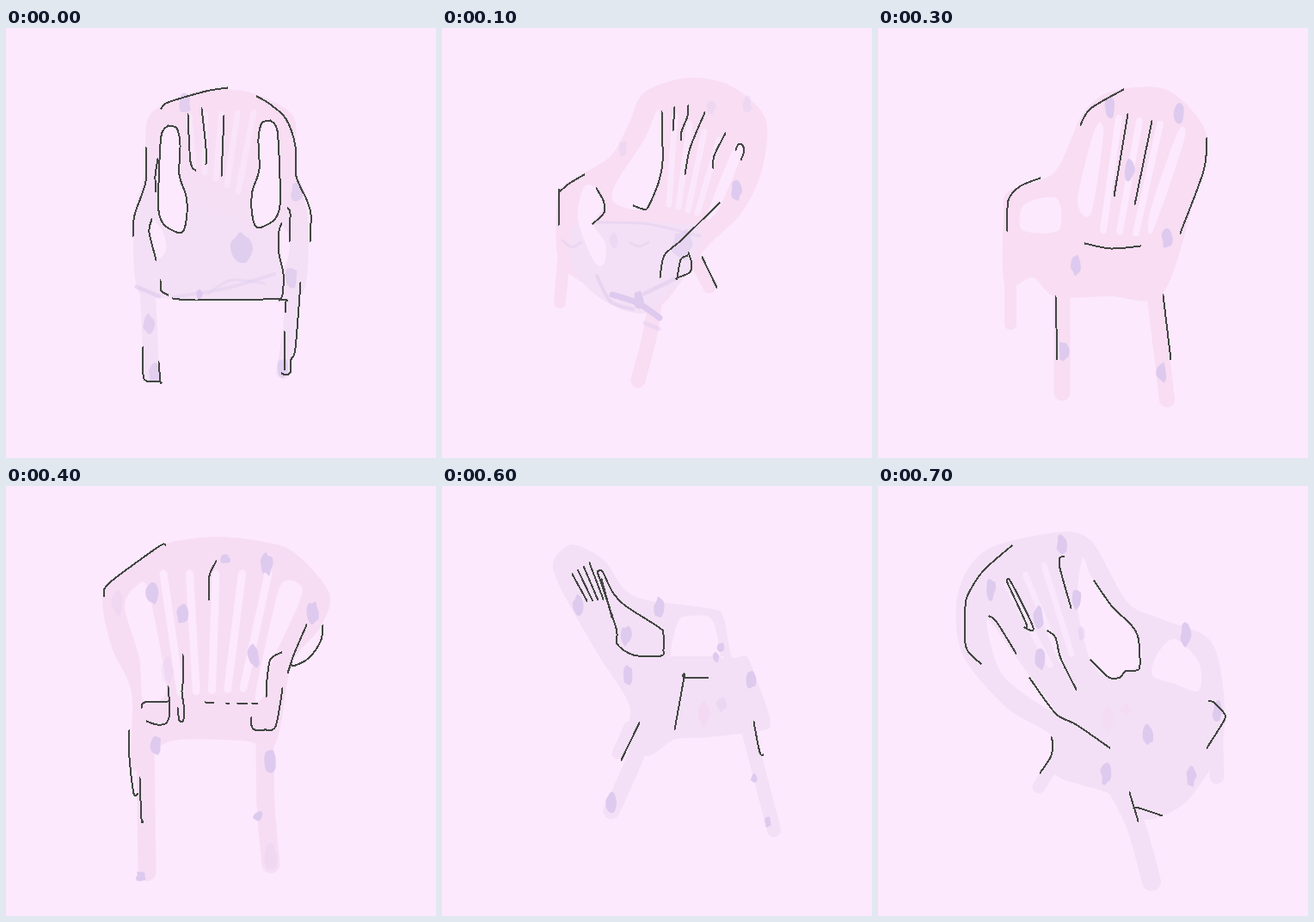
These frames come from a looping animation (500x500 px, 800 ms). An HTML page:

```html
<!DOCTYPE html>
<html lang="en">
<head>
<meta charset="utf-8">
<title>Turning chair</title>
<style>
html, body { margin: 0; width: 100%; height: 100%; overflow: hidden; background: #fce9fe; }
svg { display: block; width: 100vw; height: 100vh; }
path { stroke-linecap: round; stroke-linejoin: round; }
.ink { shape-rendering: crispEdges; transform: translate(.5px, .5px); }
</style>
</head>
<body>
<svg id="stage" viewBox="0 0 500 500"></svg>
<script>
const STEP = 100;
const BG = '#fce9fe', PINK = '#f8ddf3', LILAC = '#f3e0f6', MARK = '#ddcaee', INK = '#434643';
const stage = document.getElementById('stage');

let seed = 7;
const random = () => (seed = seed * 16807 % 2147483647) / 2147483647;

const parse = text => text.split(' ').map(s => s.split(',').map(Number));
const join = points => points.map(p => p.join()).join(' ');
const mirror = (text, sum, dy = 0) => join(parse(text).map(([x, y]) => [sum - x, y + dy]));
const symmetric = (half, sum) => half + ' ' + mirror(half.split(' ').reverse().join(' '), sum);

// Catmull-Rom spline; a repeated point makes a corner.
function curve(text, closed) {
  const p = parse(text), n = p.length, k = 0.15;
  const at = i => closed ? p[(i + n) % n] : p[Math.max(0, Math.min(n - 1, i))];
  let d = 'M' + p[0];
  for (let i = 0; i < (closed ? n : n - 1); i++) {
    const [a, b, c, e] = [at(i - 1), at(i), at(i + 1), at(i + 2)];
    const out = b.map((v, j) => v + (c[j] - a[j]) * k);
    const into = c.map((v, j) => v - (e[j] - b[j]) * k);
    d += `C${out} ${into} ${c}`;
  }
  return d;
}

const blob = (pts, fill) => `<path d="${curve(pts, true)}" fill="${fill}"/>`;
const brush = (pts, width, color, alpha = 1) =>
  `<path d="${curve(pts)}" fill="none" stroke="${color}" stroke-width="${width}" opacity="${alpha}"/>`;
const hole = pts => blob(pts, BG);
const ink = (...lines) => `<g class="ink">${lines.map(l => brush(l, 2, INK)).join('')}</g>`;
const loop = pts => pts + ' ' + pts.split(' ')[0];

// n strokes spread evenly from the first to the last one
function fan(first, last, n) {
  const a = parse(first), b = parse(last);
  return Array.from({ length: n }, (_, i) =>
    join(a.map((p, j) => p.map((v, k) => v + (b[j][k] - v) * i / (n - 1)))));
}
const gaps = (first, last, n, width, alpha) =>
  fan(first, last, n).map(g => brush(g, width, BG, alpha)).join('');

// Ragged flower prints of about the same size
function prints(places, rx = 6, ry = 12, alpha = 1) {
  return parse(places).map(([x, y]) => {
    const ring = Array.from({ length: 11 }, (_, i) => {
      const turn = i / 11 * 2 * Math.PI, r = 0.75 + 0.4 * random();
      return [x + Math.cos(turn) * rx * r, y + Math.sin(turn) * ry * r].map(v => v.toFixed(1));
    });
    return `<g opacity="${alpha}">${blob(join(ring), MARK)}</g>`;
  }).join('');
}

function front() {
  const side = '188,113 198,116 202,135 201,170 209,195 210,215 206,235 198,237 183,228 177,212 177,180 180,125';
  const other = mirror(side, 495, -6);
  const fill = 'url(#fade)';
  return [
    brush('165,312 167,350 169,402', 18, LILAC), brush('333,300 330,350 322,400', 16, LILAC),
    blob(symmetric('225,73 185,88 164,108 162,165 149,220 152,300 180,314', 500), fill),
    gaps('213,102 218,160', '288,98 270,190', 5, 7, .6),
    hole(side), hole(other), hole('168,224 182,236 186,258 174,268'), hole('319,230 329,242 329,262 322,278'),
    brush('152,301 178,312', 5, MARK, .6), brush('195,313 255,303 312,286', 4, MARK, .4), brush('235,309 262,293 300,297', 3, MARK, .4),
    prints('208,88 338,191 332,290 167,345 172,402 322,396', 7, 12, .8), prints('274,256', 12, 18, .8), prints('225,309', 4, 6),
    ink(loop(side), loop(other),
      '180,93 188,86 232,73 257,69', '291,79 305,87 325,105 336,137 337,172 349,199 354,216 353,248',
      '162,138 162,178 149,217 147,242', '211,100 214,155 220,165', '227,93 232,139 232,158', '253,102 250,172', '174,190 173,172 176,152',
      '169,222 166,237 174,269', '327,209 330,215 329,248', '320,227 317,236 317,262 322,285 321,310 317,316',
      '179,293 180,305 188,310', '193,314 220,316 318,315 324,319 324,330', '342,296 336,372 331,385 330,400 325,403 320,401',
      '323,352 323,397', '159,370 159,402 163,410 179,411 179,411 177,388')
  ];
}

function frontTurned() {
  return [
    brush('143,250 137,319', 14, PINK), brush('248,315 241,360 228,410', 17, PINK), brush('295,270 311,301', 15, PINK),
    blob('285,58 335,67 376,105 372,165 348,215 305,258 258,320 225,330 170,300 136,270 134,200 145,180 195,150 218,110 235,75', PINK),
    blob('150,235 180,225 280,228 302,240 290,275 240,330 190,318 152,280', LILAC),
    hole('252,95 256,150 240,208 203,205 200,185 235,130'), hole('165,185 180,186 188,207 176,228 190,250 188,275 176,270 158,222'), hole('340,138 349,145 322,210 308,218'),
    gaps('271,102 264,205', '322,130 297,215', 4, 7, .85),
    brush('198,310 228,320 253,337', 7, MARK), brush('236,343 252,350', 5, MARK, .4), brush('180,226 240,228 300,242', 3, MARK, .45),
    brush('180,288 196,318 222,327', 4, MARK, .5), brush('235,309 272,291', 5, MARK, .5),
    brush('140,247 151,255 162,249', 3, MARK, .4), brush('219,250 230,254 240,249', 3, MARK, .4),
    prints('342,190 228,317'), prints('279,252', 12, 18, .55), prints('313,92 210,140 355,88 200,247', 5, 9, .35),
    ink('135,229 136,190 136,190 148,180 165,170', '179,186 187,200 188,214 175,227', '255,97 256,155 251,180 239,208 233,210 222,206',
      '270,92 268,119', '286,90 285,102 278,120 278,130', '305,98 288,139 282,170', '329,122 316,148 315,163', '341,141 344,135 348,135 351,142 347,153',
      '322,203 278,246 258,264 253,290', '286,261 290,274 287,284 273,290 273,290 277,269 285,264', '302,266 319,301')
  ];
}

function side() {
  return [
    brush('141,320 141,406', 20, LILAC), brush('235,322 275,362 309,391', 23, PINK),
    blob('350,84 376,96 388,145 375,220 340,275 300,312 235,340 131,338 121,325 134,285 143,230 160,214 174,212 176,175 186,157 245,153 300,130 320,108', PINK),
    hole('330,118 322,165 306,214 297,230 270,232 268,214 256,190 268,175 300,158'),
    brush('320,155 350,167 380,178', 5, MARK, .6), brush('365,166 381,170', 9, MARK), brush('352,160 375,198', 3, MARK, .5), brush('132,378 150,390', 7, MARK),
    prints('212,229 245,253 292,231 305,277 238,318', 5, 13), prints('149,292', 10, 17), prints('176,193 163,216', 4, 3),
    ink('188,209 188,177 198,166 218,166 222,168 240,213 240,213 215,212 188,209', '314,110 328,96 356,85 370,89 380,103 388,150',
      '349,124 336,160 327,171', '351,162 331,190', '342,189 328,208 321,226', '332,218 327,240 316,260 277,281 185,291 178,294 133,294 129,304 129,351',
      '269,219 269,234 269,234 282,236 306,216', '291,306 311,297 321,287', loop('145,331 145,331 148,310 158,313 207,315 216,331 216,331'),
      loop('230,312 236,308 263,309 255,319 255,326 234,328 230,322'), '311,297 317,306 316,315 308,316 300,308 304,300')
  ];
}

function backTurned(fill) {
  return [
    brush('154,250 154,344', 14, fill), brush('214,280 214,424', 19, fill), brush('318,280 336,432', 18, fill),
    blob('290,70 340,74 382,125 366,205 330,310 270,312 206,312 180,290 148,300 146,220 152,190 205,168 235,105 258,80', fill),
    hole('170,205 208,198 210,235 168,235'), hole('252,118 262,122 248,215 232,200'), hole('348,122 356,130 320,235 316,215'),
    gaps('280,105 262,235', '328,112 300,238', 3, 8),
    prints('270,92 350,100 292,165 336,245 230,275 216,375 330,400'),
    ink('235,112 247,93 285,71', '382,128 378,166 351,238', ...fan('290,100 274,195', '318,108 298,205', 2),
      '150,236 151,200 164,184 188,174', '240,250 270,256 305,253', '206,312 208,385', '331,310 340,385')
  ];
}

function back() {
  const fill = '#f7ddf4';
  const opening = '152,116 165,120 184,215 184,245 160,250 155,200 138,140';
  return [
    brush('162,290 164,449', 21, fill), brush('301,285 302,370 308,440', 21, fill),
    blob('245,59 295,64 335,77 376,125 365,165 332,208 313,300 275,296 190,297 148,330 146,240 122,185 114,122 160,85 190,66', fill),
    hole(opening), hole('322,112 338,112 343,130 305,215 303,240 290,245 312,140'),
    gaps('183,102 203,240', '305,102 276,235', 5, 9),
    prints('170,125 205,149 303,91 357,147 288,198 174,301 307,321', 7, 13), prints('255,85 293,384 157,454', 6, 6), prints('130,135 308,432 188,215', 7, 15, .25),
    ink('114,128 114,119 126,107 177,70 185,68', '236,132 236,104 244,87', '205,196 206,222 204,238 207,262 205,273 201,272 199,258',
      '188,233 190,262 186,275 175,277 163,273', '157,257 161,251 188,250', '231,251 241,252', '255,252 259,252', '268,252 280,252', '285,252 292,252',
      '302,245 303,225 307,201 320,193', '349,161 331,205 341,206 355,196 366,178 368,162', '331,205 327,217',
      '321,235 313,279 300,283 289,283 285,278 285,268', '143,283 143,315 148,357 153,357', '155,339 157,386 159,390')
  ];
}

function otherSide() {
  return [
    brush('232,280 225,315 197,378', 19, LILAC), brush('218,280 204,311', 13, LILAC), brush('355,280 386,400', 16, LILAC),
    blob('145,70 165,72 190,88 212,120 240,133 315,143 328,155 337,198 354,198 366,225 382,275 368,285 310,292 270,295 240,314 212,300 218,255 178,190 130,100', LILAC),
    hole('266,198 268,180 276,155 290,151 310,152 318,165 324,198 324,198 266,198'),
    prints('158,139 214,174 252,142 216,219 359,225 197,369'), prints('363,340 379,391 319,199 324,188', 4, 6), prints('325,254', 6, 8, .4),
    blob('304,250 312,264 304,280 297,264', '#f4d9f5'),
    ink(...fan('151,102 168,133', '171,89 187,131', 4), '180,99 186,99 198,123 213,139 252,164 257,172 257,190 254,197 222,196 203,183 202,165 180,99', '185,108 197,152',
      '309,223 281,222 281,222 270,283', '229,275 208,318', '362,274 369,309 373,312')
  ];
}

function otherTurned() {
  return [
    brush('275,345 300,395 318,460', 22, LILAC), brush('392,270 394,338', 17, LILAC), brush('215,305 187,350', 15, LILAC),
    blob('207,54 248,64 290,135 330,155 390,185 402,290 365,360 330,384 303,386 270,358 205,335 203,292 150,258 98,195 93,125 125,75', LILAC),
    hole('319,220 325,195 345,178 373,205 373,238 345,230'), hole('238,84 251,110 302,178 303,208 268,222 247,202 232,140'), hole('127,155 165,205 205,262 145,220'),
    gaps('150,115 200,208', '193,92 225,195', 3, 7, .8),
    prints('214,69 131,120 187,152 231,132 188,201 358,173 314,289 265,335 364,337 395,262', 6, 13), prints('237,172', 4, 9, .5),
    blob('267,256 275,270 267,287 260,270', '#f5dcf5'), blob('288,253 295,260 288,267 281,260', '#f5dcf5'),
    ink('155,69 122,98 105,124 101,140 101,182 106,194 119,206', '129,151 137,157 160,194', loop('149,110 154,111 180,164 170,164 172,160'),
      '216,82 211,83 211,95 224,141', '197,168 206,176 212,200 230,236', '251,110 272,140 293,160 302,176 304,208 300,214 287,215 281,222 268,222 247,202',
      '176,223 206,264 230,277 269,304', '201,292 203,300 200,315 188,333', '384,250 390,251 402,264 402,272 382,304', '292,356 302,389', '296,374 303,374 330,383')
  ];
}

const pose = (parts, flip = '') => `<g transform="${flip}">${parts.join('')}</g>`;

stage.innerHTML = `<defs><linearGradient id="fade" x1=".6" x2=".45" y1=".2" y2=".7">
  <stop stop-color="${PINK}"/><stop offset="1" stop-color="${LILAC}"/></linearGradient></defs>` +
  pose(front()) + pose(frontTurned()) + pose(side()) + pose(backTurned(PINK)) + pose(back()) +
  pose(backTurned(LILAC), 'matrix(-1 0 0 1 474 0)') + pose(otherSide()) + pose(otherTurned());
const poses = [...stage.querySelectorAll('svg > g')];

function render(time) {
  const now = Math.floor(time / STEP) % poses.length;
  poses.forEach((g, i) => g.setAttribute('visibility', i === now ? 'visible' : 'hidden'));
}

function tick() {
  render(performance.now());
  requestAnimationFrame(tick);
}
tick();
</script>
</body>
</html>
```
